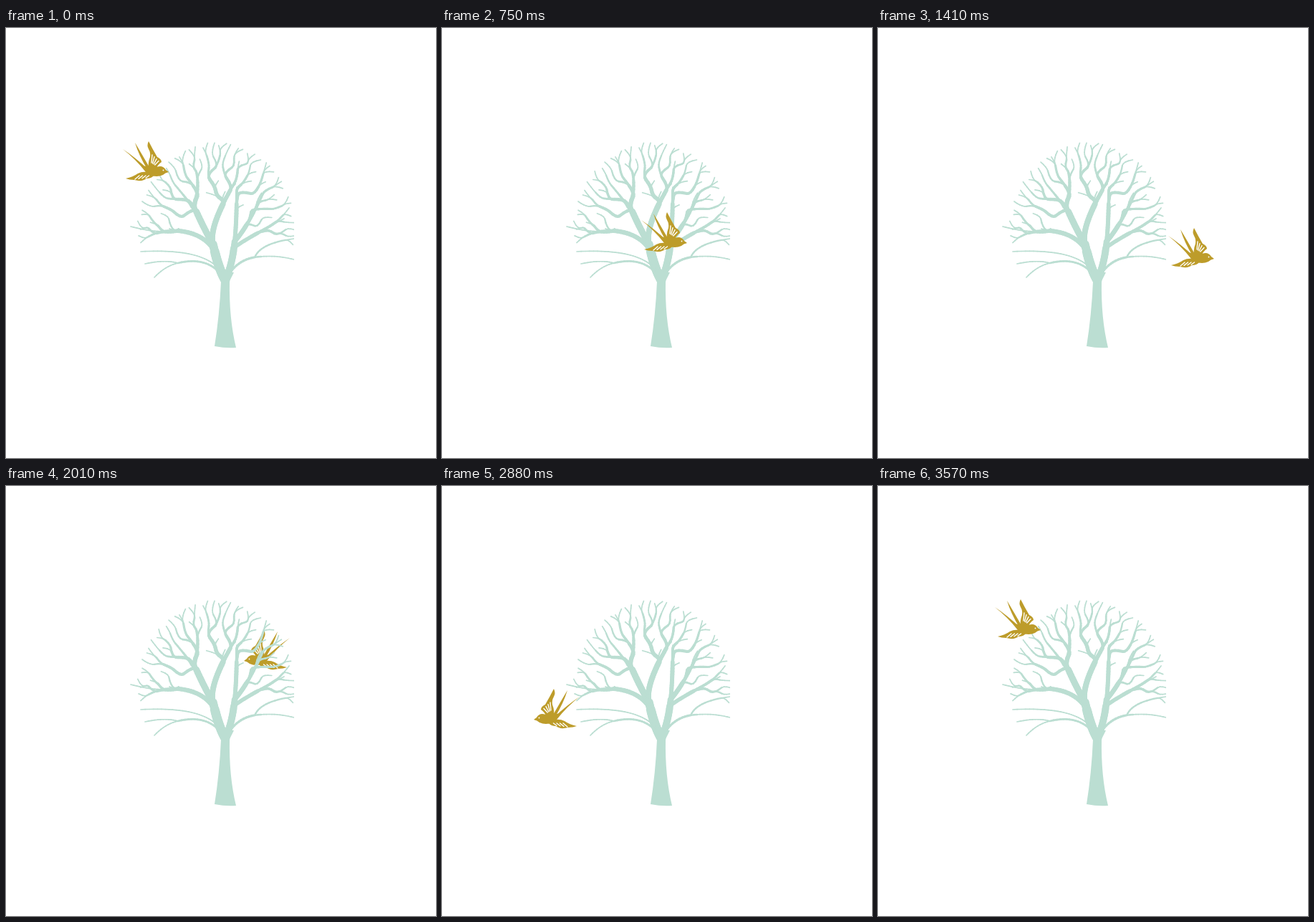
These frames come from a looping animation (600 px wide and 600 px high, 3.6 s). An HTML page with a canvas:

```html
<!DOCTYPE html>
<html lang="en">
<head>
<meta charset="utf-8">
<title>Bird around a tree</title>
<style>
html, body { margin: 0; width: 100%; height: 100%; overflow: hidden; background: #fff; }
canvas { display: block; width: 600px; height: 600px; }
</style>
</head>
<body>
<canvas id="stage" width="600" height="600"></canvas>
<script>
const LOOP = 3600, STEP = 30;
const MINT = '#bbded2', GOLD = '#bd9c2a', PAPER = '#fff';
const ctx = document.getElementById('stage').getContext('2d');

const quad = (a, b, c, u) => (1 - u) * (1 - u) * a + 2 * u * (1 - u) * b + u * u * c;

let seed = 11;
const random = () => (seed = seed * 16807 % 2147483647) / 2147483647;

// A branch is a chain of nodes; each node counts the tips it carries.
function growTree() {
  const root = { x: 306, y: 352, tips: 0, parent: null };
  const nodes = [root];

  function grow(from, cx, cy, x, y) {
    const steps = Math.max(3, Math.round(Math.hypot(x - from.x, y - from.y) / 4));
    let parent = from;
    for (let i = 1; i <= steps; i++) {
      const u = i / steps;
      parent = { x: quad(from.x, cx, x, u), y: quad(from.y, cy, y, u), tips: 0, parent };
      nodes.push(parent);
    }
    for (let n = parent; n; n = n.parent) n.tips++;
    return parent;
  }

  // Main limbs
  const left = grow(root, 296, 335, 289, 302);
  const right = grow(root, 316, 330, 319, 298);
  const lowLeft = grow(root, 285, 317, 240, 328);
  const lowRight = grow(root, 322, 320, 356, 319);
  const shelf = grow(left.parent.parent, 276, 286, 240, 283);
  grow(root.tips ? nodes[4] : root, 278, 307, 188, 312);
  grow(shelf, 212, 287, 174, 277);
  grow(lowLeft, 222, 332, 207, 348);
  grow(lowLeft, 222, 323, 194, 329);
  grow(lowRight, 378, 317, 402, 323);
  grow(left, 276, 280, 262, 248);
  grow(left, 282, 278, 319, 216);
  grow(right, 322, 270, 322, 222);
  grow(right, 338, 276, 358, 232);
  grow(right.parent.parent, 326, 299, 388, 266);
  grow(lowRight.parent.parent, 355, 300, 402, 294);

  // Rings of tips, each reaching back to the closest wood nearer the centre.
  const depth = n => Math.hypot((n.x - 294) / 109, (n.y - 290) / 128);
  for (let ring = 0.5; ring < 1.01; ring += 0.125) {
    const tips = Math.round(44 * ring * ring);
    const spread = 0.8 + 0.28 * ring;
    for (let i = 0; i < tips; i++) {
      const angle = Math.PI * (1.5 + spread * ((i + 0.25 + 0.5 * random()) / tips - 0.5));
      const r = ring + 0.05 * (random() - 0.5);
      const x = 294 + 109 * r * Math.cos(angle);
      const y = 290 + 128 * r * Math.sin(angle);
      const cost = n => Math.hypot(n.x - x, n.y - y) + 260 * Math.max(0, depth(n) - r + 0.1);
      const from = nodes.reduce((a, b) => cost(b) < cost(a) ? b : a);
      // Leave along the parent branch, then bend outwards.
      const back = from.parent || from;
      const reach = 0.35 * Math.hypot(x - from.x, y - from.y) /
        (Math.hypot(from.x - back.x, from.y - back.y) || 1);
      grow(from, from.x + (from.x - back.x) * reach, from.y + (from.y - back.y) * reach, x, y);
    }
  }
  return nodes;
}

function drawTree() {
  const sheet = document.createElement('canvas');
  sheet.width = sheet.height = 600;
  const g = sheet.getContext('2d');
  g.fillStyle = g.strokeStyle = MINT;
  g.lineCap = 'round';
  g.beginPath();
  g.rect(0, 0, 402, 600);
  g.clip();
  for (const { x, y, tips, parent } of growTree()) {
    if (!parent) continue;
    g.lineWidth = 1.7 * tips ** 0.45;
    g.beginPath();
    g.moveTo(parent.x, parent.y);
    g.lineTo(x, y);
    g.stroke();
  }
  g.fill(new Path2D('M291 444Q298 400 300 354L294 341H318L312 353Q311 405 321 446Q306 447 291 444Z'));
  return sheet;
}

const tree = drawTree();

// Bird facing right, centred on (195, 186).
const birdShape = new Path2D(
  // body and head
  'M227 201Q222 202 219 205Q210 209 201 205Q194 202 189 190Q199 197 208 195Q218 190 223 198Z' +
  // tail streamers
  'M163 169Q181 181 199 198L195 201Q181 183 163 169Z' +
  'M180 160Q189 175 201 196L197 197Q185 177 180 160Z' +
  // upper and lower wing
  'M199 158Q204 168 211 180Q217 183 217 187Q211 191 209 198L200 198Q197 190 201 180Q202 174 199 169Q196 164 199 158Z' +
  'M167 210Q177 208 184 203Q192 199 201 202L206 206Q203 210 196 210Q190 215 179 212Q172 212 167 210Z');

function drawBird(x, y, angle, mirrored) {
  ctx.save();
  ctx.translate(x, y);
  ctx.rotate(angle);
  ctx.scale(1, mirrored ? -1 : 1);
  ctx.translate(-195, -186);
  ctx.fillStyle = GOLD;
  ctx.fill(birdShape);
  ctx.strokeStyle = ctx.fillStyle = PAPER;
  ctx.lineWidth = 1.4;
  ctx.lineCap = 'round';
  ctx.beginPath();
  for (let i = 0; i < 4; i++) {
    ctx.moveTo(204 + 3 * i, 177 + 2.8 * i);
    ctx.lineTo(203 + 1.6 * i, 188 + i);
    ctx.moveTo(180 + 5 * i, 211 - 0.6 * i);
    ctx.lineTo(186 + 4.5 * i, 206);
  }
  ctx.stroke();
  ctx.beginPath();
  ctx.arc(219.5, 198.5, 0.9, 0, 7);
  ctx.fill();
  ctx.restore();
}

// Key points of the flight: time, x, y.
const flight = [
  [0, 195, 186], [750, 310, 285], [1410, 437, 307], [1620, 438, 252], [1800, 408, 217],
  [2010, 364, 229], [2400, 274, 280], [2880, 160, 311], [3240, 136, 238], [3570, 195, 186]
];

function slope(i, axis) {
  const a = flight[Math.max(0, i - 1)], b = flight[Math.min(flight.length - 1, i + 1)];
  return (b[axis] - a[axis]) / (b[0] - a[0]);
}

function position(t) {
  const next = flight.findIndex(key => key[0] > t);
  const i = (next < 0 ? flight.length - 1 : next) - 1;
  const a = flight[i], b = flight[i + 1], span = b[0] - a[0];
  const u = Math.min(1, (t - a[0]) / span), v = 1 - u;
  return [1, 2].map(axis =>
    v * v * (1 + 2 * u) * a[axis] + u * u * (3 - 2 * u) * b[axis] +
    span * u * v * (v * slope(i, axis) - u * slope(i + 1, axis)));
}

function ease(t, from, to) {
  const u = Math.max(0, Math.min(1, (t - from) / (to - from)));
  return u * u * (3 - 2 * u);
}

function render(now) {
  const t = Math.floor(now % LOOP / STEP) * STEP;
  const turn = ease(t, 1430, 1810) - ease(t, 2980, 3500);
  const behind = turn > 0.5;
  const bird = () => drawBird(...position(t), -Math.PI * turn, behind);
  ctx.fillStyle = PAPER;
  ctx.fillRect(0, 0, 600, 600);
  if (behind) bird();
  ctx.drawImage(tree, 0, 0);
  if (!behind) bird();
}

let start;
function tick(now) {
  start ??= now;
  render(now - start);
  requestAnimationFrame(tick);
}
render(0);
requestAnimationFrame(tick);
</script>
</body>
</html>
```
